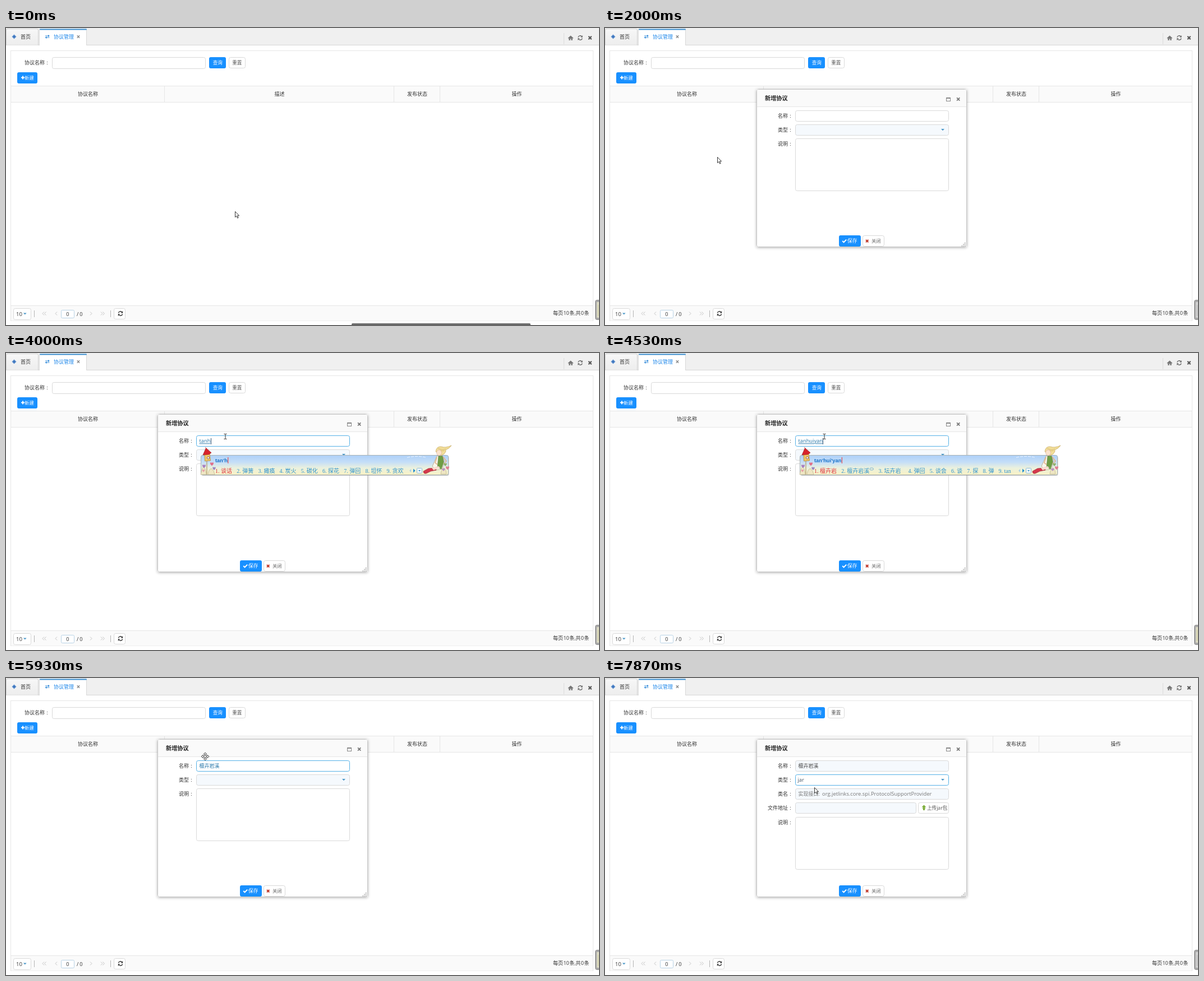
Recreate the animation shown at these times as an HTML page. Size 1057x530 px, loop 8 s.

```html
<!DOCTYPE html>
<html lang="zh-CN">
<head>
<meta charset="utf-8">
<style>
html, body { margin: 0; width: 100%; height: 100%; overflow: hidden; background: #fff; }
svg { display: block; width: 1057px; height: 530px; font-family: "Open Sans", "Noto Sans CJK SC", "Noto Sans CJK", sans-serif; }
text { white-space: pre; }
</style>
</head>
<body>
<svg id="stage" viewBox="0 0 1057 530"></svg>
<script>
const LOOP = 8000, TICKS_PER_MS = 0.015;
const BLUE = '#1890ff', HOVER = '#40a9ff', LINE = '#e6e6e6', INK = '#333';
const NAME = '檀卉岩溪';
const stage = document.getElementById('stage');
const pen = document.createElement('canvas').getContext('2d');

const rect = (x, y, w, h, fill, extra = '') =>
  `<rect x="${x}" y="${y}" width="${w}" height="${h}" fill="${fill}" ${extra}/>`;
const box = (x, y, w, h, fill, stroke, r = 3) =>
  rect(x + .5, y + .5, w - 1, h - 1, fill, `stroke="${stroke}" rx="${r}"`);
const path = (d, fill, stroke = 'none', width = 1, extra = '') =>
  `<path d="${d}" fill="${fill}" stroke="${stroke}" stroke-width="${width}" ${extra}/>`;
const line = (d, stroke, width = 1) => path(d, 'none', stroke, width);
const label = (x, cy, str, size = 9, fill = INK, extra = '') =>
  `<text x="${x}" y="${cy + size * .36}" font-size="${size}" fill="${fill}" ${extra}>${str}</text>`;
const middle = (x, cy, str, size, fill, extra = '') => label(x, cy, str, size, fill, 'text-anchor="middle" ' + extra);
const caption = (x, cy, str) => label(x, cy, str + '<tspan dx="3.2">:</tspan>');
const at = (x, y, body) => `<g transform="translate(${x} ${y})">${body}</g>`;
const cross = (x, y, r, color, w) => line(`M${x - r} ${y - r}l${2 * r} ${2 * r}m0 ${-2 * r}l${-2 * r} ${2 * r}`, color, w);
const widthOf = (str, font) => { pen.font = font; return pen.measureText(str).width; };

const refresh = (x, y, color) => at(x, y,
  line('M-3.6-.8A3.6 3.6 0 0 1 2.6-2.6M3.6 .8A3.6 3.6 0 0 1-2.6 2.6', color, 1.4) +
  path('M4.2-4.4v3.6H.8zM-4.2 4.4V.8h3.4z', color));

function tabs() {
  return rect(0, 0, 1057, 30, '#f0f0f0') + line('M0 30.5H1057', '#d6d6d6') +
    path('M.5 30.5V4q0-2.5 2.5-2.5H55q2.5 0 2.5 2.5V30.5', 'url(#tab)', '#d2d2d2') +
    path('M14.5 11.5l4 4-4 4-4-4z', '#5b8fd0') + path('M14.5 13.5l2 2-2 2-2-2z', '#3b6fb5') +
    label(26, 15.5, '首页') +
    path('M59.5 31V4q0-2 2-2h80q2 0 2 2v27', '#fff', '#d9d9d9') + rect(60, 1.5, 84, 2, '#3c8fd0', 'rx="1"') +
    line('M70 14h7M70.5 17h7', '#2b86d8', .9) + path('M75 12l2.8 2-2.8 2zM72.5 15l-2.8 2 2.8 2z', '#2b86d8') +
    label(85, 15.5, '协议管理', 9, '#1c86ea') + cross(129, 15.5, 2.2, '#888', 1.4) +
    line('M994.5 9V29', '#dcdcdc') +
    path('M1001.5 18l5-4.6 5 4.6-1 .8-.8-.7v4h-2.4v-2.8h-1.6v2.8h-2.4v-4l-.8.7z', '#777') +
    refresh(1023.5, 17.5, '#666') + cross(1041, 17.5, 2.7, '#555', 2.1);
}

function page(newHover) {
  const edges = [8.5, 282.5, 691.5, 773.5, 1046.5];
  const heads = ['协议名称', '描述', '发布状态', '操作'];
  const grey = '#c4c4c4';
  return box(8, 40, 1039, 483, '#fff', LINE, 0) +
    caption(33, 62, '协议名称') + box(82, 52, 274, 21, '#fff', '#d9d9d9') +
    rect(362, 52, 30, 20, BLUE, 'rx="3"') + middle(377.3, 62, '查询', 8.6, '#fff', 'font-weight="500"') +
    box(397, 52, 30, 20, '#fff', '#d9d9d9') + middle(411.8, 62, '重置', 8.6, '#555') +
    rect(20, 79, 36, 20, newHover ? HOVER : BLUE, 'rx="3"') +
    line('M27 88.5h6M30 85.5v6', '#fff', 1.9) + label(33, 88.5, '新建', 8.5, '#fff', 'font-weight="500"') +
    rect(9, 104, 1037, 28, '#fafafa') + line('M9 103.5H1046M9 132.5H1046', LINE) +
    line(edges.slice(1).map(x => `M${x} 104V132`).join(''), LINE) +
    heads.map((h, i) => middle((edges[i] + edges[i + 1]) / 2 + .5, 118, h, 9, INK)).join('') +
    rect(9, 496, 1037, 26.5, '#fafafa') + line('M9 495.5H1046', LINE) +
    box(13, 500, 32, 21, '#fff', '#d9d9d9') + label(18, 510.5, '10', 9.6) + path('M31 508.5h5.6l-2.8 3z', '#4a98c9') +
    line('M50.5 504v12M186.5 504v12', '#b5b5b5') +
    line('M68 506.5l-3 3 3 3M71.5 506.5l-3 3 3 3M91 506.5l-3 3 3 3M150 506.5l3 3-3 3M169 506.5l3 3-3 3M172.5 506.5l3 3-3 3', grey) +
    box(98, 503, 24, 15, '#fff', '#b9d3e6', 2) + middle(110, 510.5, '0', 9.2, INK) + label(126, 510.5, '/ 0', 9.2, INK, 'word-spacing="-.6"') +
    box(192, 500, 21, 20, '#fff', '#d9d9d9') + refresh(204, 509.5, '#333') +
    label(975, 509, '每页 10 条,共 0 条', 9, INK, 'word-spacing="-1.9"');
}

function sideWidget(k) {
  const lit = k < 20 || (k >= 53 && k < 103);
  return box(1050, 485, 10, 36, '#a8a8a8', '#909090') +
    rect(1053, 489, 5, 28, lit ? '#dcdac4' : '#d2d2d2', 'rx="1"') +
    line('M1055.5 494V514', lit ? '#cdcb9c' : '#b4b4b4') +
    (k < 25 ? path('M616 530v-1q0-2 2-2h315q2 0 2 2v1z', '#6b6b6b') : '');
}

const field = (y, w, focus, fill, h = 20) => box(339, y, w, h, fill, focus ? '#55b0e6' : '#d9d9d9');

function dialog(k, typed, saveHover) {
  const nameFocus = k >= 41 && k < 103, typeFocus = k >= 103, jar = k >= 117;
  const shift = jar ? 51 : 0;
  const textWidth = widthOf(typed, '9.3px "Open Sans", "Noto Sans CJK SC", sans-serif');
  const caret = (k >= 43 && k < 50) || (k >= 52 && k < 79);
  const composing = k >= 52 && k < 77;
  let out = `<g filter="url(#shadow)">${rect(270, 109, 375, 282, '#fff', 'rx="3"')}</g>` +
    box(270, 109, 375, 282, '#fff', '#c6c6c6') +
    rect(271, 110, 373, 30, '#fafafa', 'rx="2"') + line('M271 140.5H644', LINE) +
    label(285, 125, '新增协议', 10.2, '#222', 'font-weight="700"') +
    box(608, 124, 8, 7, 'none', '#888', 0) + rect(608, 124, 8, 2, '#888') + cross(629.7, 127, 2.6, '#777', 1.8) +
    caption(308, 156.5, '名称') + field(147, 274, nameFocus, k < 41 || nameFocus ? '#fff' : '#f5f9fd') +
    label(344.5, 157, typed, k < 77 ? 9.3 : 9, nameFocus ? '#2374a8' : '#444', composing ? 'text-decoration="underline"' : '') +
    (caret ? rect(345 + (typed ? Math.round(textWidth) : 0), 152, 1, 11, '#357') : '') +
    caption(308, 181.5, '类型') + field(172, 274, typeFocus, typeFocus ? '#fff' : '#f5f9fd') +
    path('M599 180h6l-3 3.2z', '#4a98c9');
  if (jar) {
    out += label(343.5, 182, 'jar', 9.4, '#456') +
      caption(308, 206.5, '类名') + field(197, 274, false, '#f5f9fd') +
      label(344.5, 207, '实现接口: ', 9, '#777') + label(387, 207, 'org.jetlinks.core.spi.ProtocolSupportProvider', 9.4, '#777') +
      caption(290, 231.5, '文件地址') + field(222, 216, false, '#f5f9fd') +
      box(558, 222, 55, 20, '#fff', '#d9d9d9') +
      path('M568.5 226.5l4 4h-2.2v2h1.5l-1.8 1.5v2h-3v-2l-1.8-1.5h1.5v-2h-2.2z', '#7fae3d') +
      label(574, 231.5, '上传jar包', 8.6, '#555');
  }
  out += caption(308, 206.5 + shift, '说明') + field(197 + shift, 274, false, '#fff', 94) +
    rect(417, 370, 39, 20, saveHover ? HOVER : BLUE, 'rx="3"') + line('M423.2 380l2.4 2.4 4.6-4.8', '#fff', 2) +
    label(432, 380, '保存', 8.7, '#fff', 'font-weight="500"') +
    box(459, 370, 39, 20, '#fff', '#d9d9d9') + cross(467.2, 380.2, 2.2, '#c0392b', 2) + label(475, 380, '关闭', 8.4, '#666');
  for (let i = 0; i < 6; i++) {
    const row = i < 1 ? 0 : i < 3 ? 1 : 2, col = i - row * (row + 1) / 2;
    out += rect(641 - col * 2.7, 383 + row * 2.6, 1.3, 1.3, '#777');
  }
  if (typeFocus && !jar)
    out += box(339, 192, 274, 21, '#fff', '#d0d0d0', 2) +
      (k >= 107 ? rect(340, 193, 272, 19, '#e6f4ff') : '') + label(344, 202, 'jar', 9.4, '#444');
  return out;
}

const PAIRS = '谈话 弹簧 瘫痪 炭火 碳化 探花 弹回 坦怀 贪欢';
const FULL = '檀卉岩 檀卉岩溪* 坛卉岩~ 弹回 谈会 谈 探 弹 tan';
const INPUT = [
  [52, 't', '他 她 它 天 太 听 头 同 特'],
  [53, 'ta', '他 她 它 塔 踏 塌 榻 拓 獭'],
  [56, 'tan', '谈 探 弹 坛 摊 碳 叹 贪 瘫'],
  [60, "tan'h", PAIRS],
  [61, "tan'hu", PAIRS],
  [64, "tan'hui", '弹回 谈会 贪贿 探会 谈 探 弹 坛 tan'],
  [65, "tan'hui'y", '谈会议 弹回应该* 探会友 弹回 谈会 谈 探 弹 tan'],
  [67, "tan'hui'ya", FULL],
  [68, "tan'hui'yan", FULL],
  [71, "tan'hui'yan'x", '檀卉岩溪 檀卉岩 檀卉言 弹回 谈 探 弹 tan'],
];

const heart = (x, y, s, color) =>
  at(x, y, path('M0 3C-5-1-2-4 0-1.5C2-4 5-1 0 3z', color, 'none', 1, `transform="scale(${s})"`));

function birdhouse() {
  return line('M358 193V217M352 217v-10M355 217v-7M364 217v-9', '#b39a6a', 1.2) +
    path('M354 180h9l1.5 12-10 1z', '#f1c765', '#a97b2c', .7) +
    `<circle cx="360.5" cy="187" r="2" fill="#fff" stroke="#855"/>` +
    path('M356.5 169.5l9.5 8.5-4 3-11 1z', '#d8232b', '#8e1a1f', .6) + line('M356.5 169.5l-1-1.5', '#a33') +
    path('M347 217q2-11 5-14 4 3 5 14zM360 217q1-9 6-11 5 4 6 11z', '#efe7c4', '#b4a880', .6) +
    heart(353, 202, 1.1, '#a982c0') + heart(367, 198, 1.1, '#e0708a') + heart(371, 206, 1, '#9a86c4') + heart(352, 210, .8, '#e8a0a8');
}

function girl(right) {
  return at(right, 0,
    path('M-23 176Q-22 167-14 167Q-5 170 5 165Q1 171-5 172.5Q-4 176-8 180L-13 183z', '#f3df9a', '#c2a45c', .7) +
    line('M-19 170q8 4 14 1M-15 174q5 1 8 0', '#c2a45c', .6) +
    `<ellipse cx="-17" cy="178" rx="4.5" ry="5" fill="#fbe3cb" stroke="#c99" stroke-width=".5"/>` +
    path('M-21 184l9-1 4 9-3 15-13 2-5-7z', '#faf6ea', '#a99a7a', .7) +
    path('M-18 184l7 0 2 10-4 13-7-3z', '#6f9e46', '#4d7733', .6) +
    line('M-21 186l-3 10 4 3M-10 185l6 8-5 5', '#e2b48e', 1.6) +
    path('M-45 211l9-5 13-1 1 4-10 2-8 4q-5 1-5-4z', '#d5384c', '#8f2133', .6) +
    path('M-30 205l12-3 3 3-12 4z', '#f7dccd') + path('M-14 216q1-9 6-11 4 4 4 11z', '#efe7c4', '#b4a880', .6) +
    heart(-6, 199, 1, '#8fb06a') + heart(-2, 205, 1.1, '#e07f91') + heart(-9, 208, .9, '#b291c6'));
}

function inputPanel(pinyin, words) {
  const serif = 'font-family="Liberation Serif, serif"';
  let x = 373, list = '';
  words.split(' ').forEach((entry, i) => {
    const word = entry.replace(/[*~]/, ''), color = i ? '#2f93cf' : '#e0323c';
    const latin = /^[a-z]/.test(word);
    list += label(x, 210, i + 1 + '.', 10, color, serif) +
      label(x + 10, 210, word, 10, color, latin ? serif : '');
    const end = x + 10 + word.length * (latin ? 5 : 10);
    if (entry.endsWith('*')) list += `<ellipse cx="${end + 4}" cy="207" rx="3.4" ry="2" fill="none" stroke="#6da9d0" stroke-width=".9"/>`;
    x = end + 8.2 + (entry.endsWith('*') ? 8 : entry.endsWith('~') ? 5 : 0);
  });
  const tools = Math.round(x + 2), right = tools + 70;
  const caretX = 373.5 + widthOf(pinyin, 'bold 9.3px "Liberation Sans", sans-serif');
  return rect(348.5, 184, right - 348, 35, '#777', 'opacity=".4" rx="3"') +
    rect(347.5, 182.5, right - 348, 35, 'url(#sky)', 'rx="3" stroke="#a7b2b4"') +
    `<path d="M${right - 74} 186.5q18-4 34 0" fill="none" stroke="#eef6ff" stroke-dasharray="5 2"/>` +
    birdhouse() + girl(right) +
    label(373, 191.5, pinyin, 9.3, '#1b74c9', 'font-family="Liberation Sans, sans-serif" font-weight="700"') +
    rect(caretX, 186, 1, 11, '#e33') + list +
    path(`M${tools + 3} 207v6l-3-3z`, '#a9cfe8') + path(`M${tools + 7} 206.5v7l3.6-3.5z`, '#1c8ad0') +
    box(tools + 13, 205, 10, 10, '#eef6fa', '#8dbbd6', 1) + path(`M${tools + 16} 209h4l-2 2.4z`, '#3c93c8');
}

const MOVES = [
  [5, 408, 327], [9, 280, 235], [13, 110, 125], [16, 53, 91], [18, 50, 91],
  [27, 50, 91], [30, 200, 230], [33, 430, 374], [36, 592, 280], [38, 470, 180], [40, 391, 149],
  [84, 391, 149], [87, 360, 143], [89, 355, 140], [92, 358, 145], [97, 374, 169],
  [101, 373, 178], [105, 373, 178], [112, 373, 195],
];

function pointerAt(k) {
  const next = MOVES.findIndex(m => m[0] > k);
  if (next === 0) return MOVES[0].slice(1);
  if (next < 0) return MOVES[MOVES.length - 1].slice(1);
  const [a, ax, ay] = MOVES[next - 1], [b, bx, by] = MOVES[next];
  const f = (k - a) / (b - a);
  return [ax + (bx - ax) * f, ay + (by - ay) * f];
}

const POINTERS = {
  arrow: path('M.5.5v10.2l2.3-2.2 1.8 3.8 1.6-.8-1.8-3.6h3.2z', '#fff', '#222', .9),
  hand: path('M-1 1q1-1.6 2 0v4l5 1.2q1.3.5 1 2L6 12.5H.5L-3 7.6q.3-1.6 2 .2z', '#fff', '#222', .9) + line('M2.7 5.5v2M4.8 6v2', '#222', .7),
  beam: line('M-2.5-4.5H-.6L0-4 .6-4.5H2.5M0-4V4M-2.5 4.5H-.6L0 4 .6 4.5H2.5', '#333', 1),
  move: path('M0-7l2.6 3H1v3h3v-1.6L7 0 4 2.6V1H1v3h1.6L0 7l-2.6-3H-1V1h-3v1.6L-7 0l3-2.6V-1h3v-3h-1.6z', '#fff', '#333', .9),
};

function pointerKind(k, x, y) {
  if (k < 28) return x < 57 && y < 99 ? 'hand' : 'arrow';
  if (k < 40) return 'arrow';
  if (k < 86) return 'beam';
  if (k < 103 && y < 147) return 'move';
  return y < 167 ? 'beam' : 'arrow';
}

const DEFS = `<defs>
  <linearGradient id="tab" x2="0" y2="1"><stop stop-color="#f7f7f7"/><stop offset="1" stop-color="#ededed"/></linearGradient>
  <linearGradient id="sky" x2="0" y2="1"><stop stop-color="#aed0f8"/><stop offset=".35" stop-color="#c4def8"/><stop offset=".65" stop-color="#ebf1de"/><stop offset="1" stop-color="#f9f2c4"/></linearGradient>
  <filter id="shadow" x="-10%" y="-10%" width="120%" height="120%"><feDropShadow dx="0" dy="1" stdDeviation="2.5" flood-opacity=".32"/></filter>
</defs>`;

function render(k) {
  const [x, y] = pointerAt(k);
  const entry = k < 77 && INPUT.filter(e => e[0] <= k).pop();
  const typed = k >= 77 ? NAME : entry ? entry[1].replace(/'/g, '') : '';
  const newHover = k < 28 && x < 57 && y < 99;
  const saveHover = k >= 28 && x > 417 && x < 456 && y > 370 && y < 390;
  stage.innerHTML = DEFS + tabs() + page(newHover) + sideWidget(k) +
    (k >= 24 ? dialog(k, typed, saveHover) : '') +
    (entry ? inputPanel(entry[1], entry[2]) : '') +
    at(x, y, POINTERS[pointerKind(k, x, y)]);
}

let shown = -1;
function frame(now) {
  const tick = Math.floor((now % LOOP + 5) * TICKS_PER_MS);
  if (tick !== shown) render(shown = tick);
  requestAnimationFrame(frame);
}
render(0);
requestAnimationFrame(frame);
</script>
</body>
</html>
```
